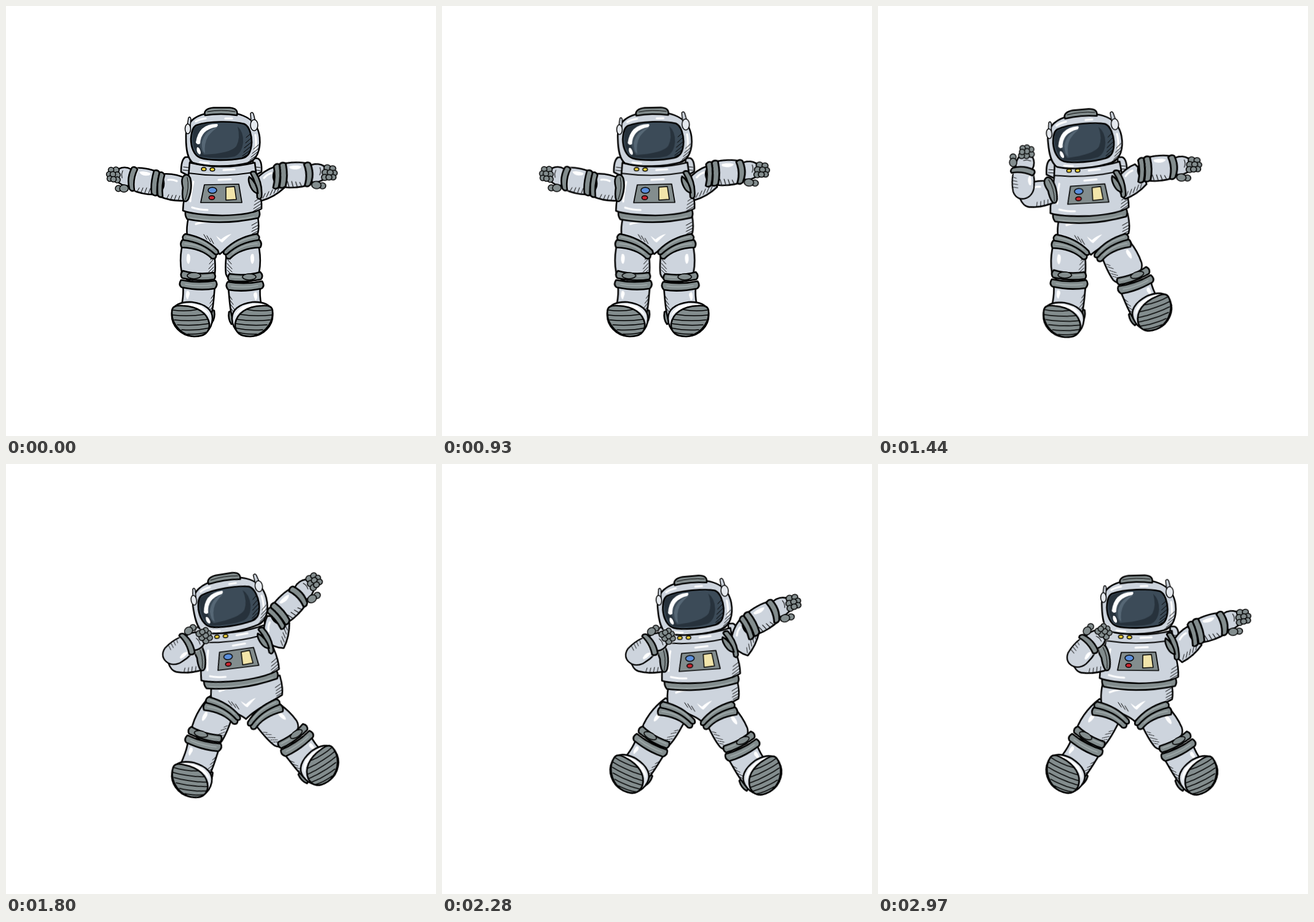
Recreate the animation shown at these times as an HTML page. Size 700 by 700 pixels, loop 3 s.

```html
<!DOCTYPE html>
<html lang="en">
<head>
<meta charset="utf-8">
<title>Floating astronaut</title>
<style>
html, body { margin: 0; width: 100%; height: 100%; overflow: hidden; background: #fff; }
svg { display: block; width: 100%; height: 100%; }
path, ellipse, circle { stroke: #000; stroke-width: 2.6; stroke-linejoin: round; stroke-linecap: round; }
.suit { fill: #cdd4dd; }
.band { fill: #838d8e; }
.shine { fill: #fff; stroke: none; }
.glow { fill: none; stroke: #fff; stroke-width: 3.2; }
.thin { fill: none; stroke-width: 1; }
.soft { fill: none; stroke: #a3adae; stroke-width: 1.5; }
.plain { stroke: none; }
.small { stroke-width: 1.5; }

/* Each part turns about its own joint. */
.part, .fade { animation: 3s linear infinite; }
#helmet    { transform-origin: 350.5px 219.5px; animation-name: helmet; }
#torso     { transform-origin: 350px 306px; animation-name: torso; }
#pelvis    { transform-origin: 352px 375px; animation-name: pelvis; }
#upperL    { transform-origin: 291px 297px; animation-name: upperL; }
#foreL     { transform-origin: 248px 290px; animation-name: foreL; }
#handL     { transform-origin: 205px 281px; animation-name: handL; filter: drop-shadow(0 0 1px #fff); }
#upperR    { transform-origin: 408px 292px; animation-name: upperR; }
#shoulderR { transform-origin: 405px 292px; animation-name: shoulderR; }
#foreR     { transform-origin: 445px 277px; animation-name: foreR; }
#handR     { transform-origin: 493px 273px; animation-name: handR; }
#thighL    { transform-origin: 314px 384px; animation-name: thighL; }
#shinL     { transform-origin: 313px 444px; animation-name: shinL; }
#footL     { transform-origin: 303px 510px; animation-name: footL; }
#cuffL     { transform-origin: 314px 384px; animation-name: cuffL; }
#thighR    { transform-origin: 386px 384px; animation-name: thighR; }
#shinR     { transform-origin: 388px 447px; animation-name: shinR; }
#footR     { transform-origin: 400px 510px; animation-name: footR; }
#cuffR     { transform-origin: 386px 384px; animation-name: cuffR; }
.fade      { animation-name: fade; }

@keyframes helmet {
  37% { transform: translate(-8px, 0) rotate(-1.5deg); animation-timing-function: ease-in; }
  48% { transform: translate(-16px, 3px) rotate(-5deg); }
  60% { transform: translate(12px, 13px) rotate(-9deg); animation-timing-function: ease-out; }
  76% { transform: translate(58.5px, 17px) rotate(-5deg); animation-timing-function: ease-out; }
  99%, 100% { transform: translate(71.5px, 16px) rotate(-1.5deg); }
}
@keyframes torso {
  37% { transform: translate(-6px, 0) rotate(-.5deg); animation-timing-function: ease-in; }
  48% { transform: translate(-9px, 1px) rotate(-3deg); }
  60% { transform: translate(26px, 12px) rotate(-7deg); animation-timing-function: ease-out; }
  76% { transform: translate(68px, 15.5px) rotate(-4deg); animation-timing-function: ease-out; }
  99%, 100% { transform: translate(73px, 16px) rotate(.5deg); }
}
@keyframes pelvis {
  37% { transform: translate(-3px, 0) rotate(0deg); animation-timing-function: ease-in; }
  48% { transform: translate(-2px, 1px) rotate(-1deg); }
  60% { transform: translate(40px, 11px) rotate(-5deg); animation-timing-function: ease-out; }
  76% { transform: translate(73px, 15px) rotate(-3deg); animation-timing-function: ease-out; }
  99%, 100% { transform: translate(69px, 15px) rotate(-2deg); }
}
@keyframes upperL {
  37% { transform: translate(-6px, 0) rotate(.5deg); animation-timing-function: ease-in; }
  48% { transform: translate(-11px, 4px) rotate(-20deg); }
  60% { transform: translate(23px, 19px) rotate(-14deg); animation-timing-function: ease-out; }
  76% { transform: translate(67px, 21px) rotate(-9deg); animation-timing-function: ease-out; }
  99%, 100% { transform: translate(76px, 19px) rotate(-16deg); }
}
/* The bent forearm is foreshortened. */
@keyframes foreL {
  37% { transform: translate(-6px, 0) rotate(1deg) scale(1); animation-timing-function: ease-in; }
  48% { transform: translate(-12px, 16px) rotate(78deg) scale(.88); }
  60% { transform: translate(17px, 25px) rotate(132deg) scale(.88); animation-timing-function: ease-out; }
  76% { transform: translate(61px, 26px) rotate(132deg) scale(.88); animation-timing-function: ease-out; }
  99%, 100% { transform: translate(71px, 31px) rotate(119deg) scale(.88); }
}
@keyframes handL {
  37% { transform: rotate(0deg) scale(1); animation-timing-function: ease-in; }
  48%, 100% { transform: rotate(11deg) scale(1.13); }
}
@keyframes upperR {
  37% { transform: translate(-6px, -1px) rotate(-1deg); animation-timing-function: ease-in; }
  48% { transform: translate(-16px, -2px) rotate(-5deg); }
  60% { transform: translate(20px, -3px) rotate(-48deg); animation-timing-function: ease-out; }
  76% { transform: translate(69px, 4px) rotate(-35deg); animation-timing-function: ease-out; }
  99%, 100% { transform: translate(74px, 8px) rotate(-12deg); }
}
@keyframes shoulderR {
  37% { transform: translate(-6px, -1px) rotate(-1deg); animation-timing-function: ease-in; }
  48% { transform: translate(-14px, -2px) rotate(-3deg); }
  60% { transform: translate(16px, -4px) rotate(-10deg); animation-timing-function: ease-out; }
  76% { transform: translate(63px, 2px) rotate(-10deg); animation-timing-function: ease-out; }
  99%, 100% { transform: translate(73px, 5px) rotate(-3deg); }
}
@keyframes foreR {
  37% { transform: translate(-7px, -4px) rotate(-1deg); animation-timing-function: ease-in; }
  48% { transform: translate(-12px, -10px) rotate(-2deg); }
  60% { transform: translate(-2px, -29px) rotate(-41deg); animation-timing-function: ease-out; }
  76% { transform: translate(55px, -13px) rotate(-28deg); animation-timing-function: ease-out; }
  99%, 100% { transform: translate(72px, -2px) rotate(-16deg); }
}
@keyframes handR {
  60% { transform: rotate(0deg); animation-timing-function: ease-out; }
  76% { transform: rotate(8deg); }
  99%, 100% { transform: rotate(3deg); }
}
@keyframes thighL {
  37% { transform: translate(-3px, 0) rotate(0deg); animation-timing-function: ease-in; }
  48% { transform: translate(-2px, 1px) rotate(1deg); }
  60% { transform: translate(37px, 10px) rotate(27deg); animation-timing-function: ease-out; }
  76% { transform: translate(66px, 16px) rotate(36deg); animation-timing-function: ease-out; }
  99%, 100% { transform: translate(63px, 17px) rotate(35deg); }
}
@keyframes shinL {
  37% { transform: translate(-2px, 0) rotate(0deg); animation-timing-function: ease-in; }
  48% { transform: translate(-2px, -1px) rotate(.5deg); }
  60% { transform: translate(10px, 2px) rotate(13deg); animation-timing-function: ease-out; }
  76% { transform: translate(30px, 6px) rotate(27deg); animation-timing-function: ease-out; }
  99%, 100% { transform: translate(29px, 6px) rotate(27deg); }
}
@keyframes footL {
  37% { transform: translate(-1px, 0) rotate(0deg); animation-timing-function: ease-in; }
  48% { transform: translate(-1px, 1px) rotate(3deg); }
  60% { transform: translate(-1px, 4px) rotate(9deg); animation-timing-function: ease-out; }
  76%, 100% { transform: translate(1px, -5px) rotate(25deg); }
}
@keyframes cuffL {
  37% { transform: translate(-3px, 0) rotate(0deg); animation-timing-function: ease-in; }
  48% { transform: translate(-2px, 1px) rotate(0deg); }
  60% { transform: translate(37px, 10px) rotate(5deg); animation-timing-function: ease-out; }
  76% { transform: translate(67px, 17px) rotate(3deg); animation-timing-function: ease-out; }
  99%, 100% { transform: translate(64px, 17px) rotate(3deg); }
}
@keyframes thighR {
  37% { transform: translate(-3px, 0) rotate(0deg); animation-timing-function: ease-in; }
  48% { transform: translate(-4px, 3px) rotate(-29deg); }
  60% { transform: translate(33px, 18px) rotate(-46deg); animation-timing-function: ease-out; }
  76% { transform: translate(62px, 18px) rotate(-33deg); animation-timing-function: ease-out; }
  99%, 100% { transform: translate(59px, 18px) rotate(-34deg); }
}
@keyframes shinR {
  37% { transform: translate(-1px, 0) rotate(0deg); animation-timing-function: ease-in; }
  48% { transform: translate(28px, -1px) rotate(-18deg); }
  60% { transform: translate(81px, 2px) rotate(-33deg); animation-timing-function: ease-out; }
  76%, 100% { transform: translate(97px, 12px) rotate(-25deg); }
}
@keyframes footR {
  37% { transform: translate(0, 0) rotate(0deg); animation-timing-function: ease-in; }
  48% { transform: translate(46px, -11px) rotate(-20deg); }
  60% { transform: translate(111px, -18px) rotate(-33deg); animation-timing-function: ease-out; }
  76%, 100% { transform: translate(122px, -2px) rotate(-28deg); }
}
@keyframes cuffR {
  37% { transform: translate(-3px, 0) rotate(0deg); animation-timing-function: ease-in; }
  48% { transform: translate(-4px, 2px) rotate(-6deg); }
  60% { transform: translate(35px, 16px) rotate(-12deg); animation-timing-function: ease-out; }
  76% { transform: translate(65px, 18px) rotate(-6deg); animation-timing-function: ease-out; }
  99%, 100% { transform: translate(62px, 18px) rotate(-6deg); }
}
@keyframes fade { 0%, 40% { opacity: 1; } 45%, 100% { opacity: 0; } }
</style>
</head>
<body>
<svg viewBox="0 0 700 700">
  <defs>
    <g id="thigh">
      <path class="suit" d="M290 378C283 400 283 418 286 434Q290 448 312 450Q336 450 340 436C342 420 339 405 338 395L330 376Z"/>
      <path class="shine" d="M295 404Q299 402 300 409Q300 418 297 420Q292 416 295 404Z"/>
      <path class="thin" d="M337 408l-4 5M337 413l-6 7M338 419l-8 9M338 425l-8 8M338 430l-5 5"/>
    </g>
    <g id="shin">
      <path class="band" d="M330 492L339 496Q341 508 335 516L328 512Z"/>
      <path class="suit" d="M288 456C290 470 287 480 285 494L332 510C338 495 338 475 340 457Z"/>
      <path class="shine" d="M294 464Q299 463 299 469L296 478Q291 474 294 464Z"/>
      <path class="thin" d="M338 470l-4 6M338 476l-6 8M337 483l-7 9M336 490l-6 8"/>
      <path class="band" d="M285 446Q280 454 286 458Q315 464 340 460Q346 453 341 447Q312 452 285 446Z"/>
      <path class="band" d="M288 431Q282 437 287 443Q315 449 339 445Q343 439 338 434Q312 438 288 431Z"/>
      <path class="soft" d="M292 453Q313 457 335 454M320 440L335 439"/>
      <ellipse class="band small" cx="306" cy="439" rx="11" ry="5"/>
    </g>
    <g id="foot">
      <path fill="#dfe4ea" d="M270 500C271 487 284 481 303 482C325 485 337 495 336 510C335 528 322 538 305 538C285 537 268 520 270 500Z"/>
      <path class="shine" d="M280 487Q296 481 318 489Q330 497 331 505Q318 488 280 487Z"/>
      <path class="band" d="M270 498C270 489 276 487 288 488C312 489 328 500 331 517C332 532 322 538 307 538C288 537 269 520 270 498Z"/>
      <path class="thin" style="stroke-width:1.5" d="M272 495Q293 498 312 494M271 503Q298 506 323 502M274 511Q302 514 329 510M279 519Q306 521 331 517M286 527Q308 529 331 524M296 534Q312 535 326 531"/>
    </g>
    <g id="cuff">
      <path class="band" d="M288 380Q282 386 286 393Q318 394 335 411Q343 413 342 404Q322 385 288 380Z"/>
      <path class="band" d="M292 371Q285 375 289 381Q320 385 340 404Q348 406 345 398Q325 377 292 371Z"/>
      <path class="soft" d="M294 376Q320 380 336 395M291 387Q315 388 331 402"/>
    </g>
    <g id="forearm">
      <path class="suit" d="M207 264Q222 262 238 267C263 273 263 305 240 307Q222 307 204 299Q199 280 207 264Z"/>
      <path class="shine" d="M217 270Q226 268 235 272Q236 276 230 276Q220 277 217 270Z"/>
      <path class="thin" d="M214 301l3-5M220 303l3-7M226 304l3-8M232 305l3-8"/>
    </g>
    <g id="elbow">
      <path class="band" d="M241 268Q235 288 237 305Q241 310 246 308Q245 290 250 271Q247 266 241 268Z"/>
      <path class="band" d="M250 271Q245 290 247 308Q250 313 255 310Q253 292 258 275Q255 269 250 271Z"/>
    </g>
    <g id="hand">
      <path class="suit" d="M204 266Q194 260 184 265L180 284Q188 294 202 293Z"/>
      <path class="thin" d="M190 268Q187 274 189 280"/>
      <g class="band">
        <circle class="small" cx="183" cy="297" r="5"/>
        <ellipse class="small" cx="192" cy="297" rx="7" ry="6"/>
        <circle class="small" cx="179" cy="267" r="5"/>
        <circle class="small" cx="171" cy="267" r="4.5"/>
        <circle class="small" cx="181" cy="275" r="5"/>
        <circle class="small" cx="168" cy="274" r="4.5"/>
        <circle class="small" cx="174" cy="274" r="4.5"/>
        <circle class="small" cx="181" cy="283" r="5"/>
        <circle class="small" cx="169" cy="281" r="4.5"/>
        <circle class="small" cx="175" cy="282" r="4.5"/>
      </g>
    </g>
    <path id="wrist" class="band" d="M205 263Q196 280 201 298Q205 303 209 300Q206 282 214 266Q210 260 205 263Z"/>
  </defs>

  <g id="thighL" class="part"><use href="#thigh"/></g>
  <g id="thighR" class="part"><use href="#thigh" transform="matrix(-1 0 0 1 698 0)"/></g>
  <g id="shinL" class="part"><use href="#shin"/></g>
  <g id="shinR" class="part"><use href="#shin" transform="matrix(-1 0 0 1 702 2)"/></g>
  <g id="footL" class="part"><use href="#foot"/></g>
  <g id="footR" class="part"><use href="#foot" transform="matrix(-1 0 0 1 704 0)"/></g>

  <g id="pelvis" class="part">
    <path class="suit" d="M298 340Q293 360 295 374L312 384Q340 395 348 404Q360 393 390 380L410 370Q413 358 409 338Z"/>
    <path class="shine" d="M342 374L350 380Q358 373 367 371L352 385Q348 384 342 374Z"/>
    <path class="glow" d="M309 355Q321 351 333 351"/>
    <path class="thin" d="M409 352l-9 5M410 357l-9 5M410 362l-10 5M409 367l-8 4M322 372l5 8M327 374l6 10M333 378l5 9"/>
  </g>
  <g id="cuffL" class="part"><use href="#cuff"/></g>
  <g id="cuffR" class="part"><use href="#cuff" transform="matrix(-1 0 0 1 700 0)"/></g>

  <g id="torso" class="part">
    <path class="suit" d="M292 246Q285 250 285 270L300 278V246ZM409 248Q417 250 416 270L402 278V248Z"/>
    <path class="thin" d="M289 262l8 1M288 267l9 1M406 262l8 1M406 267l8 1"/>
    <path class="band" d="M293 332Q290 340 295 347Q352 358 411 345Q415 339 411 331Z"/>
    <path class="soft" d="M300 345Q352 354 404 343"/>
    <path class="suit" d="M299 255Q352 268 405 255Q407 275 411 295Q417 315 416 330Q400 340 352 341Q305 340 288 333Q289 312 294 295Q298 275 299 255Z"/>
    <path class="thin" style="stroke-width:1.8" d="M297 272Q352 280 407 270"/>
    <path class="glow" d="M305 286Q301 303 300 318M303 328Q316 332 328 332M354 267L372 266M346 283L366 282"/>
    <path class="thin" d="M414 312l-9 6M415 317l-11 7M415 322l-12 8M415 327l-12 7M412 332l-9 4"/>
    <ellipse class="small" fill="#efd13b" cx="322" cy="265.5" rx="3.8" ry="2.8"/>
    <ellipse class="small" fill="#efd13b" cx="336" cy="266" rx="3.8" ry="2.8"/>
    <path class="band" style="stroke-width:1.7" d="M323 291L379 290L384 320L317 320Z"/>
    <ellipse class="small" fill="#5b8fdd" cx="336" cy="300" rx="7" ry="4.7"/>
    <ellipse class="small" fill="#cd2730" cx="335" cy="312" rx="4.7" ry="3.3"/>
    <path class="small" fill="#f2e5aa" d="M358 295L372 294L375 315L358 316Z"/>
  </g>

  <g id="upperR" class="part">
    <path class="suit" d="M405 284Q420 267 437 262Q450 275 453 296Q437 311 416 317Q405 304 405 284Z"/>
    <path class="glow" d="M420 280Q425 274 432 272"/>
    <path class="thin" d="M418 313l4-8M424 311l4-9M430 308l4-9M436 305l4-9M442 302l3-7"/>
  </g>
  <g id="shoulderR" class="part">
    <path class="band" d="M398 272Q409 290 409 312Q413 317 416 311Q418 288 406 270Q400 268 398 272Z"/>
    <path class="band" d="M396 278Q393 284 399 296Q403 304 410 305Q409 288 396 278Z"/>
  </g>
  <g id="foreR" class="part">
    <g transform="translate(445 277) rotate(7) scale(-1.1 1) translate(-248 -290)">
      <use href="#forearm"/><use href="#elbow"/>
    </g>
    <g id="handR" class="part">
      <g transform="translate(445 277) rotate(7) scale(-1.1 1) translate(-248 -290)">
        <use href="#hand"/><use href="#wrist"/>
      </g>
    </g>
  </g>

  <g id="helmet" class="part">
    <path class="suit" d="M293 214C292 187 309 174 349 172C390 173 410 187 413 214C415 236 407 250 396 255C365 263 325 262 304 255C295 248 293 233 293 214Z"/>
    <path class="band" d="M324 178C321 170 329 166 338 165.500L364 165.500C373 166 378 170 376 178Q350 174 324 178Z"/>
    <path class="thin" d="M328 172Q350 168 373 172"/>
    <path class="glow" d="M309 188Q316 184 325 183M357 183L368 183M406 210Q408 222 406 234M316 254L330 256"/>
    <path class="thin" d="M411 226l-8 7M411 232l-10 8M409 238l-10 8M407 244l-10 7M402 250l-8 4"/>
    <path fill="#3c4b58" d="M310 194C330 187 370 187 388 192C397 196 400 212 400 222C399 240 393 246 384 248C362 252 330 252 316 247C306 243 301 230 301 216C302 204 304 197 310 194Z"/>
    <path class="plain" fill="#27323c" d="M306 199Q301 220 309 238L316 245Q350 250 372 245Q384 240 386 222Q387 205 377 196Q382 215 375 228Q366 240 322 242Q309 222 317 203Q322 196 332 192Q314 193 306 199Z"/>
    <path class="plain" fill="#566775" d="M345 197Q324 202 319 222Q318 236 324 240Q322 224 329 212Q336 203 345 197Z"/>
    <path class="thin" d="M398 208l-7 6M399 215l-9 8M399 222l-11 9M398 229l-11 9M396 236l-11 8M391 243l-8 5"/>
    <path class="shine" d="M344 192Q314 191 309 222Q311 227 316 224Q317 201 343 197Q346 194 344 192Z"/>
    <path class="shine" d="M311 230Q315 229 317 238Q317 243 314 241Q309 237 311 230Z"/>
    <path class="suit small" d="M295 195L297 182Q300 179 301 184L300 196ZM399 188L398 175Q401 171 403 176L406 188Z"/>
    <ellipse class="suit small" style="fill:#e5e9ee" cx="296" cy="200" rx="4.5" ry="8"/>
    <ellipse class="suit small" style="fill:#e5e9ee" cx="404" cy="194" rx="6" ry="9"/>
  </g>

  <g id="upperL" class="part">
    <path class="suit" d="M249 274Q275 271 293 281L290 317Q268 318 250 310C238 304 238 280 249 274Z"/>
    <path class="glow" d="M264 283Q271 282 278 285"/>
    <path class="thin" d="M262 313l3-6M268 315l3-7M274 316l3-8M280 317l3-8"/>
    <path class="band" d="M290 276Q284 281 288 296Q286 310 289 317Q294 320 297 314Q304 296 300 280Q296 272 290 276Z"/>
    <path class="thin" d="M295 279Q299 296 292 315"/>
  </g>
  <g id="foreL" class="part">
    <use href="#forearm"/>
    <use href="#elbow" class="fade"/>
    <g id="handL" class="part"><use href="#hand"/><use href="#wrist"/></g>
  </g>
</svg>
</body>
</html>
```
